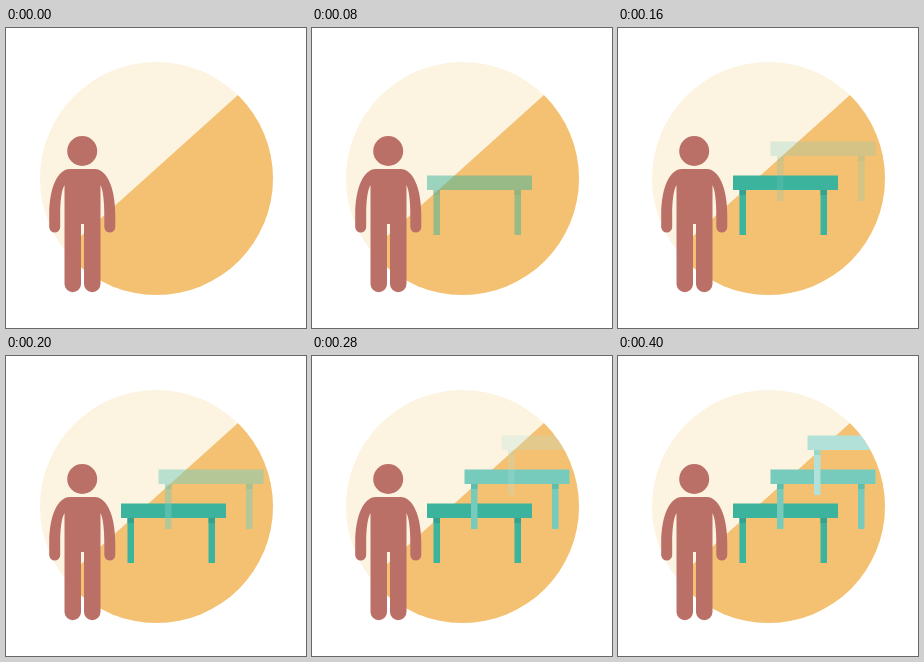
Animation of 300 by 300 pixels, one loop 2000 ms. Source, as an HTML page:

```html
<!DOCTYPE html>
<html lang="en">
<head>
<meta charset="utf-8">
<title>Person and tables</title>
<style>
  html, body { margin: 0; width: 100%; height: 100%; overflow: hidden; background: #fff; }
  svg { display: block; width: 100%; height: 100%; }
  .table { opacity: 0; }
</style>
</head>
<body>
<svg viewBox="0 0 300 300">
  <defs>
    <clipPath id="disc"><circle cx="150.5" cy="150.5" r="116.5"/></clipPath>
  </defs>
  <g clip-path="url(#disc)">
    <rect width="300" height="300" fill="#fcf4e1"/>
    <path d="M268 34.5 L20 257.5 V300 H300 V34.5Z" fill="#f4c173"/>
    <g id="tables"></g>
  </g>
  <g fill="#bb7067">
    <circle cx="76.2" cy="123" r="15"/>
    <path d="M64 141 H88.500 C101 141 109.300 160 109.300 187 V199
      A5.500 5.500 0 0 1 98.300 199 V187 C98.300 173 97 162 94.500 157
      V256 A8.200 8.200 0 0 1 78 256 V196 H75 V256 A8.200 8.200 0 0 1 58.500 256
      V157 C55.500 162 54.200 173 54.200 187 V199 A5.500 5.500 0 0 1 43.200 199
      V187 C43.200 160 51.500 141 64 141Z"/>
  </g>
</svg>
<script>
  const LOOP = 2000, STEP = 40, FADE_STEPS = 4, STAGGER = 3;
  const tables = [
    { x: 115, y: 147.5, color: '#3cb39c', shade: '#36a28d' },
    { x: 152.5, y: 113.5, color: '#76cbbd', shade: '#5fbdab' },
    { x: 189.5, y: 79.5, color: '#b1e1d9', shade: '#9bd5c9' }
  ];
  const root = document.getElementById('tables');
  const rect = (x, y, w, h, fill) =>
    `<rect x="${x}" y="${y}" width="${w}" height="${h}" fill="${fill}"/>`;

  root.innerHTML = tables.map(({ x, y, color, shade }) => {
    const leg = dx => rect(x + dx, y + 14, 6.5, 45.5, color) + rect(x + dx, y + 14, 6.5, 5.5, shade);
    return `<g class="table">${leg(6.5)}${leg(87.5)}${rect(x, y, 105, 14.5, color)}</g>`;
  }).join('');

  // Each table fades in by quarters; the next starts as this one becomes solid.
  [...root.children].forEach((table, i) => {
    const frames = [{ opacity: 0, offset: 0, easing: 'step-end' }];
    for (let k = 1; k <= FADE_STEPS; k++) {
      frames.push({
        opacity: k / FADE_STEPS,
        offset: (i * STAGGER + k) * STEP / LOOP,
        easing: 'step-end'
      });
    }
    frames.push({ opacity: 1, offset: 1 });
    // The small lead keeps step boundaries clear of rounding.
    table.animate(frames, { duration: LOOP, iterations: Infinity, delay: -0.5 });
  });
</script>
</body>
</html>
```
